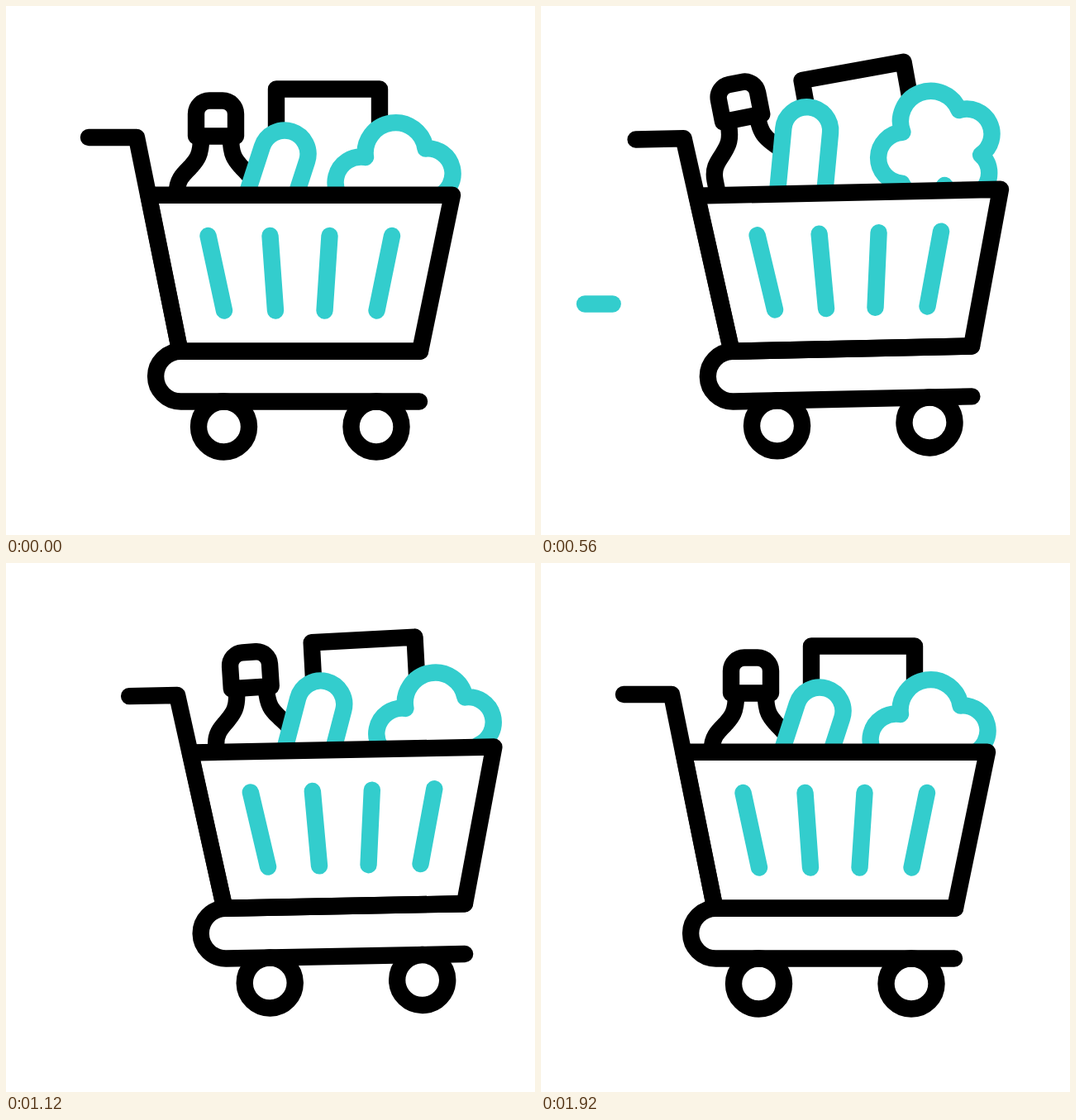
Animation, 640 px wide and 640 px high, one loop 2240 ms. Source, as an HTML page:

```html
<!DOCTYPE html>
<html lang="en">
<head>
<meta charset="utf-8">
<title>Shopping cart</title>
<style>
  html, body { margin: 0; width: 100%; height: 100%; overflow: hidden; background: #fff; }
  svg { display: block; width: 100vw; height: 100vh; }
  path, circle, line {
    fill: none; stroke: #000; stroke-width: 20.4;
    stroke-linecap: round; stroke-linejoin: round;
  }
  .teal { stroke: #33cdcd; }
  .solid { fill: #fff; }
</style>
</head>
<body>
<svg viewBox="0 0 640 640">
  <line class="teal dash"/>
  <line class="teal dash"/>
  <g id="cart">
    <g id="bag"><path class="solid" d="M327 260V100.5H452V260"/></g>
    <g id="bottle">
      <path class="solid" d="M236 160C236 183 229 188 222 196C213 205 207 211 207 225V260H301V225C301 211 295 205 286 196C279 188 272 183 272 160"/>
      <path class="solid" d="M230 157.5V130.5a16 16 0 0 1 16-16h16a16 16 0 0 1 16 16V157.5Z"/>
    </g>
    <g id="bread">
      <path class="teal solid" transform="translate(337 179) rotate(18)" d="M-28.5 90V0a28.5 28.5 0 0 1 57 0V90"/>
    </g>
    <g id="broccoli">
      <path class="teal solid" d="M420 243A31 31 0 0 1 435 183A36.2 36.2 0 0 1 507.5 172.5A30.3 30.3 0 0 1 521 231A29 29 0 1 1 470 257A29 29 0 0 1 420 243Z"/>
    </g>
    <circle cx="263.5" cy="509" r="30.5"/>
    <circle cx="448" cy="509" r="30.5"/>
    <path class="solid" d="M172.5 228.7H540L501 417.7H210.5Z"/>
    <path d="M100 159H158L210.5 417.7M501 417.7H211.5a30.4 30.4 0 0 0 0 60.8H500"/>
    <path class="teal" d="M244.5 278L264 368.5M319.5 278L326 368.5M391.5 278L385.5 368.5M467 278L448.5 368.5"/>
  </g>
</svg>
<script>
const LOOP = 2240, STEP = 40;
const SETTLED = 1400;   // everything in the cart is at rest again
const HALF_SWING = 320;

// Listed in the order they react; swing holds the turning points in degrees
const items = [
  { id: "bag", pivot: "260 251.5", swing: [-13.5, 6.5, -2] },
  { id: "bread", pivot: "190 315", swing: [-13, 6.2, -2.4] },
  { id: "bottle", pivot: "117 288", swing: [-10, 3.5, -3.2] },
  { id: "broccoli", pivot: "305 228", swing: [-12, 1.2, -2] }
];
const dashes = document.querySelectorAll(".dash");

const clamp = u => Math.min(1, Math.max(0, u));
const easeOut = u => 1 - (1 - clamp(u)) ** 1.8;
const easeBoth = u => (1 - Math.cos(Math.PI * clamp(u))) / 2;

// Pull back, dash forward, roll home
const cartX = t =>
  -31 * easeOut(t / 400) + 85 * easeOut((t - 400) / 400) - 54 * easeOut((t - SETTLED) / 520);

// One lift of the front, then two smaller hops, 400 ms apart
function cartTilt(t) {
  if (t >= SETTLED) return 0;
  if (t < 400) return -5 * Math.sin(t / 400 * Math.PI / 2);
  const height = [5, 3.9, 1.4][Math.round(t / 400) - 1];
  return -height * Math.abs(Math.cos(t / 400 * Math.PI)) ** 1.2;
}

// Each item follows the one before it by 40 ms
function itemAngle({ swing }, order, t) {
  const start = 140 + 40 * order;
  let angle = 0;
  [...swing, 0].forEach((next, i) => {
    const from = start + HALF_SWING * i;
    const to = i < swing.length ? from + HALF_SWING : SETTLED;
    angle += (next - angle) * easeBoth((t - from) / (to - from));
  });
  return angle;
}

function drawDash(dash, i, t) {
  const start = 440 + 120 * i, y = 360.5 + 40.5 * i;
  const along = begin => 53 + 4 * i + 101 * clamp((t - begin) / 360);
  const head = along(start), tail = along(start + 120);
  const ends = { x1: tail, x2: head, y1: y, y2: y };
  for (const name in ends) dash.setAttribute(name, ends[name]);
  dash.style.display = head > tail ? "" : "none";
}

function setTransform(id, value) {
  document.getElementById(id).setAttribute("transform", value);
}

function draw(t) {
  setTransform("cart", `translate(${cartX(t)} 0) rotate(${cartTilt(t)} 212 418)`);
  items.forEach((item, i) =>
    setTransform(item.id, `rotate(${itemAngle(item, i, t)} ${item.pivot})`));
  dashes.forEach((dash, i) => drawDash(dash, i, t));
}

let origin;
function tick(now) {
  origin ??= now;
  const t = Math.max(0, now - origin) % LOOP;
  draw(Math.floor(t / STEP) * STEP);
  requestAnimationFrame(tick);
}
draw(0);
requestAnimationFrame(tick);
</script>
</body>
</html>
```
